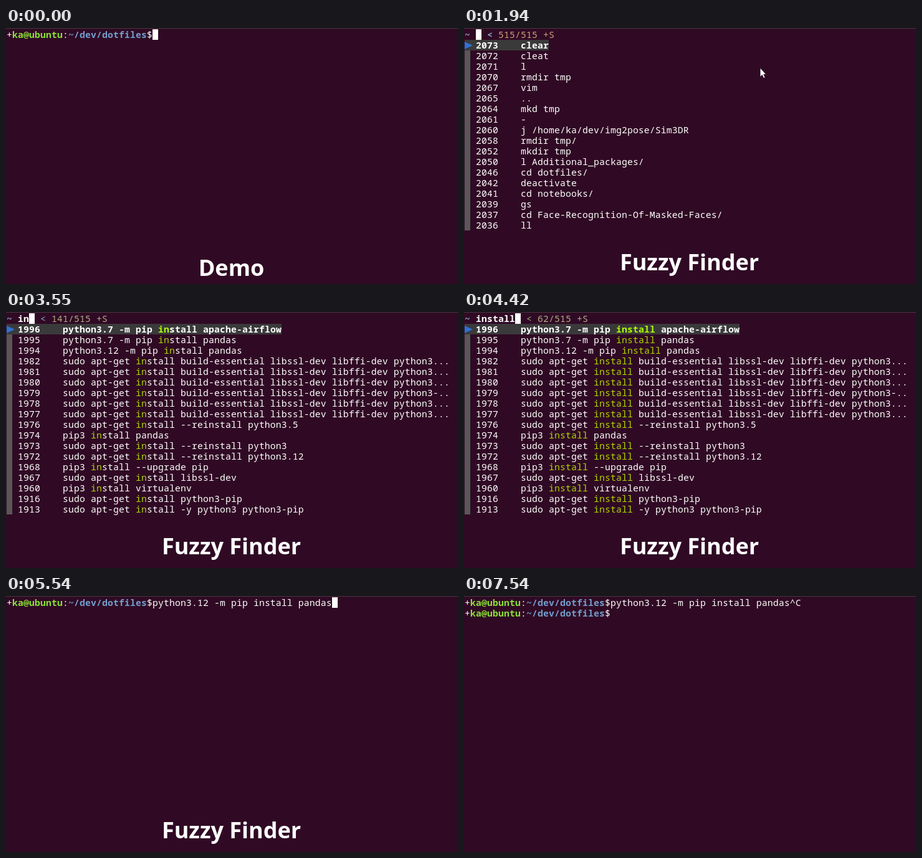
An HTML page for the animation above (8000 ms loop, 725 px wide and 411 px high).

```html
<!DOCTYPE html>
<html lang="en">
<head>
<meta charset="utf-8">
<title>Terminal fuzzy finder</title>
<style>
html, body { margin: 0; width: 100%; height: 100%; overflow: hidden; background: #300a24; }
svg { display: block; width: 725px; height: 411px; }
text { white-space: pre; }
.term { font: 14.667px "Noto Sans Mono", "DejaVu Sans Mono", monospace; letter-spacing: 0.2px; }
.bold { font-weight: bold; }
.caption { font: bold 36px "Open Sans", "Noto Sans", sans-serif; fill: #fff; text-anchor: middle; }
</style>
</head>
<body>
<svg id="stage" viewBox="0 0 725 411"></svg>
<script>
const LOOP = 8000, CW = 9, RH = 17, ROWS = 18;
const WHITE = '#ffffff', GREEN = '#8ae234', BLUE = '#729fcf';
const COMMAND = 'python3.12 -m pip install pandas';
const stage = document.getElementById('stage');

const BUILD = 'sudo apt-get install build-essential libssl-dev libffi-dev python3';
const recent = [
  [2073, 'clear'], [2072, 'cleat'], [2071, 'l'], [2070, 'rmdir tmp'],
  [2067, 'vim'], [2065, '..'], [2064, 'mkd tmp'], [2061, '-'],
  [2060, 'j /home/ka/dev/img2pose/Sim3DR'], [2058, 'rmdir tmp/'],
  [2052, 'mkdir tmp'], [2050, 'l Additional_packages/'],
  [2046, 'cd dotfiles/'], [2042, 'deactivate'], [2041, 'cd notebooks/'],
  [2039, 'gs'], [2037, 'cd Face-Recognition-Of-Masked-Faces/'], [2036, 'll']
];
const older = [
  [1996, 'python3.7 -m pip install apache-airflow'],
  [1995, 'python3.7 -m pip install pandas'],
  [1994, COMMAND],
  ...[1982, 1981, 1980, 1979, 1978, 1977].map(n => [n, BUILD + (n === 1979 ? '-..' : '...')]),
  [1976, 'sudo apt-get install --reinstall python3.5'],
  [1974, 'pip3 install pandas'],
  [1973, 'sudo apt-get install --reinstall python3'],
  [1972, 'sudo apt-get install --reinstall python3.12'],
  [1968, 'pip3 install --upgrade pip'],
  [1967, 'sudo apt-get install libssl-dev'],
  [1960, 'pip3 install virtualenv'],
  [1916, 'sudo apt-get install python3-pip'],
  [1913, 'sudo apt-get install -y python3 python3-pip']
];
const history = [...recent, ...older];

// Start time, query text and number of matches
const typing = [
  [0, '', 515], [3280, 'i', 305], [3550, 'in', 141], [3620, 'ins', 66],
  [3820, 'inst', 62], [4020, 'insta', 62], [4220, 'instal', 62], [4420, 'install', 62]
];

const between = (t, a, b) => t >= a && t < b;
const esc = s => s.replace(/&/g, '&amp;').replace(/</g, '&lt;');
const rect = (x, y, w, h, fill) =>
  `<rect x="${x}" y="${y}" width="${w}" height="${h}" fill="${fill}"/>`;
const cellX = col => 1 + col * CW;
const cellY = row => 2 + row * RH;
const put = (col, row, str, fill = WHITE, bold = false) =>
  `<text class="term${bold ? ' bold' : ''}" x="${cellX(col)}" y="${cellY(row) + 14}" ` +
  `fill="${fill}">${esc(str)}</text>`;
const block = (col, row) => rect(cellX(col), cellY(row), CW, RH, WHITE);
const caption = (str, y) => `<text class="caption" x="361.5" y="${y}">${str}</text>`;

function shellPrompt(row) {
  return put(0, row, '+') + put(1, row, 'ka@ubuntu', GREEN, true) + put(10, row, ':') +
    put(11, row, '~/dev/dotfiles', BLUE, true) + put(25, row, '$');
}

function matchStart(cmd, query) {
  const word = cmd.search(new RegExp('\\b' + query));
  return word < 0 ? cmd.indexOf(query) : word;
}

function listRow(row, [id, cmd], query, current) {
  let out = current
    ? rect(1, cellY(row), CW * (9 + cmd.length + 1), RH, '#3a3a3a') +
      `<path d="M1 ${cellY(row) + 3}L14 ${cellY(row) + 9}L1 ${cellY(row) + 15}Z" fill="${row > 1 ? '#1a7fd0' : '#2e72d2'}"/>`
    : rect(1, cellY(row), CW, RH, '#585858');
  out += put(2, row, String(id), WHITE, current);
  const at = query ? matchStart(cmd, query) : cmd.length;
  const end = at + query.length;
  out += put(10, row, cmd.slice(0, at), WHITE, current);
  if (query) {
    out += put(10 + at, row, query, current ? '#afff00' : '#afd700', current);
    out += put(10 + end, row, cmd.slice(end), WHITE, current);
  }
  return out;
}

function finder(t) {
  const [, query, count] = typing.filter(k => t >= k[0]).pop();
  const filter = t < 3350 ? '' : query;
  const total = t < 3350 ? 515 : count;
  const rows = history.filter(h => h[1].includes(filter)).slice(0, ROWS);
  const selected = t < 4950 ? 0 : t < 5210 ? 1 : 2;
  const after = 2 + query.length;
  const info = !filter ? '#d0a078' : '#afaf87';
  let out = put(0, 0, '~', '#87afd7', true) + put(2, 0, query, WHITE, true);
  if (!between(t, 2470, 3080)) out += block(after, 0);
  out += put(after + 2, 0, '<', query.length > 2 ? '#9fb080' : '#87afd7', !query);
  out += put(after + 4, 0, `${total}/515 +S`, info);
  rows.forEach((h, i) => { out += listRow(i + 1, h, filter, i === selected); });
  return out;
}

function pointer(t) {
  if (!between(t, 70, 3280)) return '';
  if (t >= 1880) {
    return '<path d="M475 64V78.5L478.3 75.4L480.6 80.6L483 79.5L480.7 74.4H484.6Z" ' +
      'fill="#fff" stroke="#1a0614" stroke-width=".8"/>';
  }
  const step = [70, 140, 210, 340, 420, 610, 680].filter(s => t >= s).pop();
  const p = Math.min(1, (step - 70) / 450);
  const ease = 1 - (1 - p) ** 2;
  const x = Math.round(580 - 100 * ease - (step >= 680 ? 4 : 0));
  const y = Math.round(258 - 188 * ease);
  return `<path d="M${x - 3} ${y - 8}h6M${x} ${y - 8}v16M${x - 3} ${y + 8}h6" fill="none" stroke="#fff"/>`;
}

function scene(t) {
  let out = rect(0, 0, 725, 411, '#300a24') + rect(0, 0, 725, 1, '#45393f');
  if (between(t, 1880, 5540)) {
    out += finder(t);
  } else {
    out += shellPrompt(0);
    if (t < 1880) {
      if (!between(t, 70, 680)) out += block(26, 0);
    } else {
      out += put(26, 0, COMMAND + (t >= 6150 ? '^C' : ''));
      if (t < 6150) {
        out += block(26 + COMMAND.length, 0);
      } else {
        out += shellPrompt(1);
        if (!between(t, 6750, 6950) && t < 7540) out += block(26, 1);
      }
    }
  }
  if (t < 680) out += caption('Demo', 398);
  if (between(t, 1810, 6220)) out += caption('Fuzzy Finder', 389);
  return out + pointer(t);
}

let shown = '';
function draw(now) {
  const next = scene(now % LOOP);
  if (next !== shown) stage.innerHTML = shown = next;
}

const start = performance.now();
function tick() {
  draw(performance.now() - start);
  requestAnimationFrame(tick);
}
tick();
</script>
</body>
</html>
```
